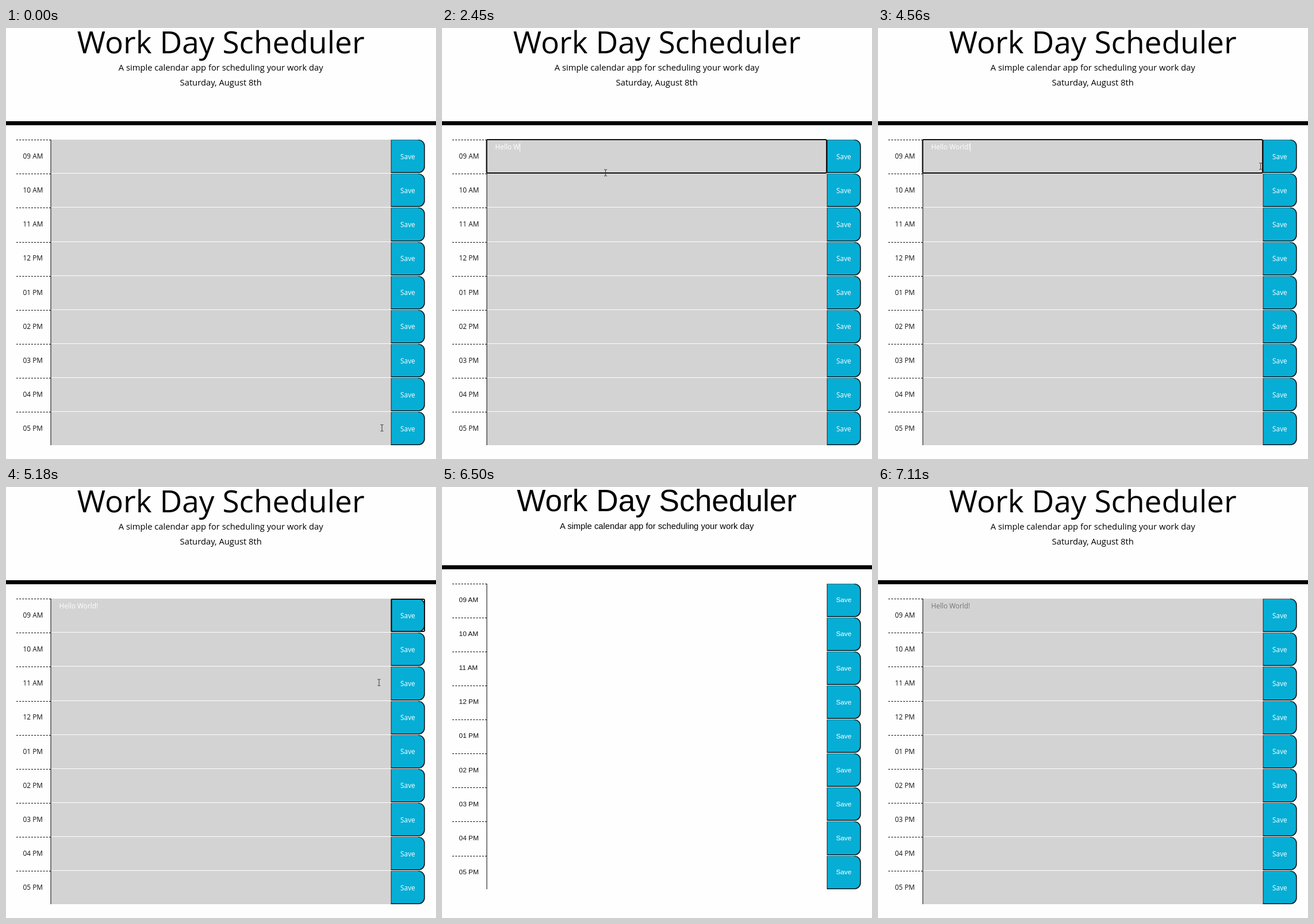
These frames come from a looping animation (748x749 px, 7.81 s). An HTML page:

```html
<!DOCTYPE html>
<html lang="en">
<head>
<meta charset="utf-8">
<title>Work Day Scheduler</title>
<style>
  html, body { margin: 0; width: 100%; height: 100%; overflow: hidden; background: #fefefe; }
  svg { display: block; }
  text { font-size: 11.82px; white-space: pre; }
  .styled, #note { font-family: "Open Sans", sans-serif; }
  .plain { font-family: "Liberation Sans", Arial, sans-serif; }
  .title { font-size: 53.2px; }
  .lead { font-size: 14.78px; }
  .mid { text-anchor: middle; }
  .ring { fill: none; stroke: #101010; stroke-width: 2; }
</style>
</head>
<body>
<svg width="748" height="749" viewBox="0 0 748 749">
  <g id="styled" class="styled"></g>
  <g id="plain" class="plain"></g>
  <text id="note" x="92.6" y="211"></text>
  <rect id="fieldRing" class="ring" x="77.5" y="194" width="591.5" height="58" rx="2"/>
  <rect id="saveRing" class="ring" x="670.5" y="195" width="57.5" height="56" rx="2"/>
  <rect id="caret" y="200" width="1" height="14.5" fill="#fff"/>
  <path id="beam" d="M-2.5-5.5h2l.5.5.5-.5h2M0-5V5M-2.5 5.5h2L0 5l.5.5h2" fill="none" stroke="#333"/>
  <path id="hand" d="M-1.5 1Q0-1 1.5 1V6Q3 5 4 6.5Q6 6 6.5 7.5Q8.5 7 8.5 9V12L7 17H-1L-5 10.5Q-5 8-3 9.5L-1.5 11Z"
        fill="#fff" stroke="#111" stroke-linejoin="round"/>
</svg>
<script>
const LOOP = 7810;
const MESSAGE = "Hello World!";
const KEY_TIMES = [1440, 1670, 1820, 1900, 2070, 2220, 2450, 2680, 2850, 2920, 3070, 3380];
const HOURS = ["09 AM", "10 AM", "11 AM", "12 PM", "01 PM", "02 PM", "03 PM", "04 PM", "05 PM"];
const ROW_PITCH = 59.125;

// Vertical layout with the final style and while the style is still loading.
const STYLED = { title: 44, lead: 74, bar: 162, rows: 194.2, hour: 32.8, save: 33.6 };
const PLAIN = { title: 42, lead: 73, bar: 136, rows: 167.6, hour: 32.3, save: 32.7 };

const easeInOut = p => (1 - Math.cos(Math.PI * p)) / 2;
const easeOut = p => 1 - (1 - p) ** 2.5;

// Pointer moves: quadratic curves (start, control, end) seen in discrete steps.
const MOVES = [
  { from: 70, to: 520, steps: 7, ease: easeInOut, curve: [[654, 695], [450, 430], [284.5, 251.5]] },
  { from: 4250, to: 4710, steps: 7, ease: easeOut, curve: [[284.5, 251.5], [484, 270], [683, 237.5]] },
  { from: 5030, to: 5800, steps: 11, ease: easeInOut, curve: [[683, 237.5], [470, 945], [211.5, 55]] },
  { from: 5870, to: 5950, steps: 1, ease: p => p, curve: [[211.5, 55], [196, 30], [180, 6]] },
];

const el = id => document.getElementById(id);
const show = (id, on) => { el(id).style.display = on ? "" : "none"; };
const within = (t, a, b) => t >= a && t < b;

function row(label, i, layout) {
  const exact = layout.rows + ROW_PITCH * i;
  const y = Math.round(exact);
  const next = Math.round(exact + ROW_PITCH);
  const h = next - y - 1;
  return `
    <path d="M18 ${y + .5}H78" stroke="#000" stroke-dasharray="3 2.18"/>
    <text x="29.6" y="${Math.round(exact + layout.hour)}" fill="#111">${label}</text>
    ${layout === STYLED ? `<rect x="78" y="${y}" width="591" height="${h}" fill="#d3d3d3"/>` : ""}
    <rect x="77.5" y="${y}" width="1" height="${i < HOURS.length - 1 ? h + 1 : h}"/>
    <path d="M669.5 ${y}h48.2a11 11 0 0 1 11 11v${h - 22}a11 11 0 0 1-11 11h-48.2z" fill="#111"/>
    <path d="M670.5 ${y + 1}h46.7a10 10 0 0 1 10 10v${h - 22.5}a10 10 0 0 1-10 10h-46.7z" fill="#06aed5"/>
    <path d="M670 ${y + .5}h47" stroke="#5c6467"/>
    <text class="mid" x="698.9" y="${Math.round(exact + layout.save)}" fill="#fff">Save</text>`;
}

function page(layout) {
  const centered = (style, y, text) => `<text class="${style} mid" x="373.7" y="${y}">${text}</text>`;
  return centered("title", layout.title, "Work Day Scheduler")
    + centered("lead", layout.lead, "A simple calendar app for scheduling your work day")
    + (layout === STYLED ? centered("lead", 100, "Saturday, August 8th") : "")
    + `<rect y="${layout.bar}" width="748" height="7"/>`
    + HOURS.map((label, i) => row(label, i, layout)).join("");
}

function pointerAt(t) {
  const move = MOVES.filter(m => t >= m.from).pop();
  if (!move) return MOVES[0].curve[0];
  const { from, to, steps, ease, curve: [a, b, c] } = move;
  const span = (to - from) / Math.max(1, steps - 1);
  const u = ease(Math.min(steps, Math.floor((t - from) / span + 1e-6) + 1) / steps);
  return a.map((v, k) => (1 - u) ** 2 * v + 2 * u * (1 - u) * b[k] + u * u * c[k]);
}

function draw(t) {
  const loading = within(t, 6500, 6590);
  const reloaded = t >= 6590;
  show("plain", loading);
  show("styled", !loading);

  const note = el("note");
  const typed = KEY_TIMES.filter(k => t >= k).length;
  note.textContent = MESSAGE.slice(0, typed);
  note.setAttribute("fill", reloaded ? "#757575" : "#fff");
  show("note", !loading);

  show("fieldRing", within(t, 670, 4860));
  show("saveRing", within(t, 4860, 6500));
  show("caret", within(t, 670, 1210) || within(t, 1440, 3930) || within(t, 4430, 4860));
  const width = typed && !loading ? note.getComputedTextLength() : 0;
  el("caret").setAttribute("x", Math.floor(92.6 + width));

  const [x, y] = pointerAt(t);
  const visible = t < 5950;
  const onButton = x > 669.5 && y > 194;
  show("beam", visible && !onButton);
  show("hand", visible && onButton);
  for (const id of ["beam", "hand"]) el(id).setAttribute("transform", `translate(${x} ${y})`);
}

el("styled").innerHTML = page(STYLED);
el("plain").innerHTML = page(PLAIN);

const start = performance.now();
function tick() {
  draw((performance.now() - start) % LOOP);
  requestAnimationFrame(tick);
}
tick();
</script>
</body>
</html>
```
